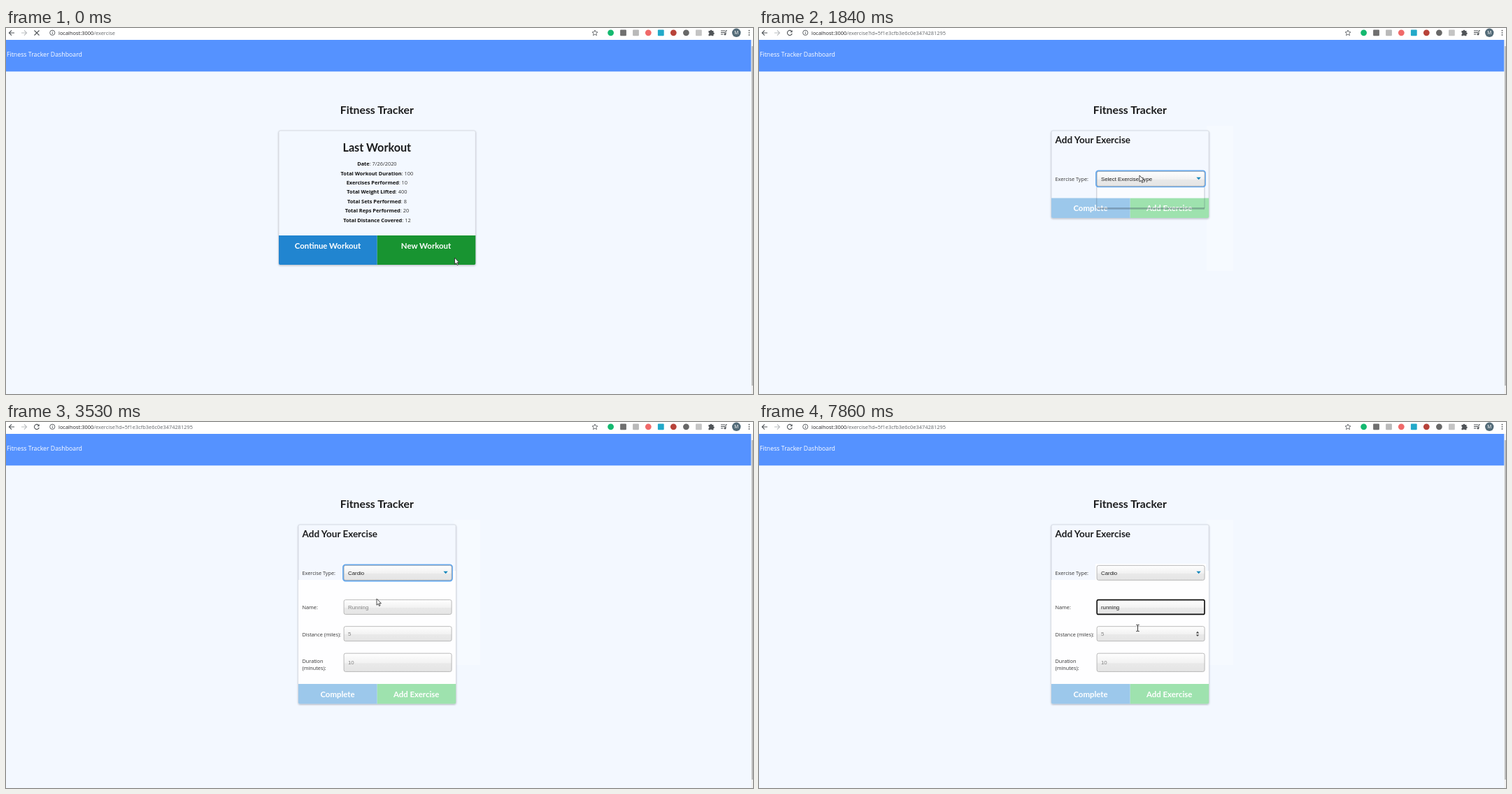
Recreate the animation shown at these times as an HTML page. Size 1068 by 524 pixels, loop 8000 ms.

```html
<!DOCTYPE html>
<html lang="en">
<head>
<meta charset="utf-8">
<title>Fitness Tracker</title>
<style>
  html, body { margin: 0; width: 100%; height: 100%; overflow: hidden; background: #f3f8ff; }
  svg { display: block; width: 1068px; height: 524px; }
  text { font: 7.3px "Open Sans", "Noto Sans", sans-serif; fill: #333; white-space: pre; }
  .mid { text-anchor: middle; }
  .head { font: 700 15.8px Lato, sans-serif; fill: #1b1c1d; }
  .btn { font: 700 11.4px Lato, sans-serif; fill: #fff; text-anchor: middle; }
  .url { font-size: 7.45px; fill: #63676b; }
  .row { font-size: 7.4px; text-anchor: middle; }
  .row tspan { font-weight: 700; fill: #111; }
  .field { font: 7.87px "Liberation Sans", Arial, sans-serif; fill: #222; }
  .hint { fill: #858585; }
  .line { fill: none; stroke: #505458; stroke-width: 1.1; }
</style>
</head>
<body>
<svg viewBox="0 0 1068 524">
  <defs>
    <linearGradient id="shade" x2="0" y2="1">
      <stop offset="0" stop-color="#fff"/><stop offset=".18" stop-color="#fafafa"/>
      <stop offset=".52" stop-color="#f2f2f2"/><stop offset=".56" stop-color="#e9e9e9"/>
      <stop offset="1" stop-color="#e5e5e5"/>
    </linearGradient>
    <filter id="soft" x="-10%" y="-10%" width="120%" height="125%">
      <feDropShadow dx="0" dy="1" stdDeviation="1" flood-color="#556" flood-opacity=".4"/>
    </filter>
  </defs>

  <rect width="1068" height="524" fill="#f3f8ff"/>
  <rect width="1068" height="17" fill="#fff"/>
  <rect y="17" width="1065.5" height="45.3" fill="#5592ff"/>
  <rect x="1065.5" y="17" width="2.5" height="507" fill="#f1f1f1"/>
  <rect x="1066" y="26" width="2" height="486" fill="#bcbcbc"/>

  <g class="line">
    <path d="M12 7H4.5M8 3.4 4.4 7 8 10.6"/>
    <path d="M22 7h7.5M26 3.4 29.6 7 26 10.6" stroke="#babdc0"/>
    <path id="stop" d="M40.5 3.5l7 7M47.5 3.5l-7 7"/>
    <g id="reload"><path d="M46.6 4.6A3.5 3.5 0 1 0 47.3 8"/><path d="M47.7 3v3.2h-3.2z" fill="#505458" stroke="none"/></g>
    <circle cx="66.3" cy="6.8" r="3.6" stroke-width=".9"/>
    <path d="M66.3 6.3v2.6M66.3 4.6v.9" stroke-width=".9"/>
    <path d="M842 3l1.1 2.6 2.9.3-2.2 1.9.7 2.8-2.5-1.5-2.5 1.5.7-2.8-2.2-1.9 2.9-.3z" stroke-width=".8"/>
    <path d="M1022 4h6M1022 6.5h6M1022 9h3.5" stroke-width="1"/>
    <path d="M1029 9V3.8h2" stroke-width="1"/>
  </g>
  <circle cx="1028" cy="9" r="1.4" fill="#505458"/>
  <g id="addons"></g>
  <path d="M1004.5 4h2.2a1.3 1.3 0 0 1 2.6 0h2.2v2.4a1.3 1.3 0 0 1 0 2.6v2.2h-2.4a1.3 1.3 0 0 0-2.4 0h-2.2V8.9a1.3 1.3 0 0 0 0-2.5z" fill="#505458"/>
  <circle cx="1044.3" cy="6.8" r="6.2" fill="#536b78"/>
  <text class="mid" x="1044.3" y="9.2" style="font-size:6.6px;fill:#fff">M</text>
  <g fill="#505458"><circle cx="1062.5" cy="3.7" r=".9"/><circle cx="1062.5" cy="6.8" r=".9"/><circle cx="1062.5" cy="9.9" r=".9"/></g>

  <text class="url" x="75" y="9.6"><tspan fill="#202124">localhost:3000</tspan>/exercise<tspan id="query">?id=5f1e3cfb3e6c0e3474281295</tspan></text>
  <text x="1" y="41" style="font-size:8.77px;fill:#fff">Fitness Tracker Dashboard</text>
  <text class="head mid" x="530.3" y="123.3">Fitness Tracker</text>

  <g id="dash">
    <rect x="390" y="147" width="281.3" height="192" rx="2" fill="#f3f8ff" stroke="#d0d3d8" stroke-width=".7" filter="url(#soft)"/>
    <text class="head mid" x="530.3" y="176.7" style="font-size:16.2px">Last Workout</text>
    <g id="stats"></g>
    <path d="M390 297h140.7v42H392a2 2 0 0 1-2-2z" fill="#2185d0"/>
    <path d="M530.7 297h140.6v40a2 2 0 0 1-2 2H530.7z" fill="#189431"/>
    <text class="btn" x="460" y="316">Continue Workout</text>
    <text class="btn" x="600.5" y="316">New Workout</text>
  </g>

  <g id="form">
    <rect id="glow" y="140" height="208" fill="#f6faff"/>
    <rect id="card" x="418" y="147" width="225.2" rx="2" stroke="#ccd2da" stroke-width=".7" filter="url(#soft)"/>
    <path id="white" d="M481 203h158v10h4v164H418V226h63z" fill="#fefeff"/>
    <text class="head" x="423.5" y="165.4" style="font-size:13.5px">Add Your Exercise</text>
    <text x="423.5" y="219">Exercise Type:</text>
    <rect id="ring" x="482.3" y="204.6" width="155.4" height="22.6" rx="3" fill="none" stroke="#62a8f0" stroke-width="2.4"/>
    <g id="select"></g>
    <text id="choice" class="field" x="489" y="218.5"></text>
    <path d="M625.4 213.8h6.4l-3.2 3.4z" fill="#0c86bb"/>

    <g id="more">
      <text x="423.5" y="268.4">Name:</text>
      <text x="423.5" y="306.5">Distance (miles):</text>
      <text x="423.5" y="344.8">Duration</text>
      <text x="423.5" y="355.2">(minutes):</text>
      <g id="inputs"></g>
      <rect id="focus" x="483.2" y="254.6" width="153.8" height="20.8" rx="2" fill="none" stroke="#111" stroke-width="1.6"/>
      <text id="name" class="field" x="489" y="268"></text>
      <path id="caret" d="M0 260.3v9.6" stroke="#111" stroke-width=".8"/>
      <text class="field hint" x="489" y="306.1">5</text>
      <text class="field hint" x="489" y="347.3">10</text>
      <path id="spin" d="M624.8 302.4h4.4l-2.2-2.6zM624.8 304.4h4.4l-2.2 2.6z" fill="#444"/>
    </g>

    <g id="buttons">
      <path d="M418 243.4h112.7V272H420a2 2 0 0 1-2-2z" fill="#9cc8eb"/>
      <path d="M530.7 243.4h112.5V270a2 2 0 0 1-2 2H530.7z" fill="#9ee2ae"/>
      <text class="btn" x="474" y="262">Complete</text>
      <text class="btn" x="586.7" y="262">Add Exercise</text>
    </g>

    <g id="opening">
      <rect x="482.8" y="228" width="154.2" height="15.4" fill="#fff" opacity=".6"/>
      <path d="M482.8 228v30H637v-30" fill="none" stroke="#456" stroke-opacity=".3"/>
      <path d="M483 258.6h154" stroke="#345" stroke-opacity=".22" stroke-width="3"/>
    </g>
    <g id="menu">
      <rect x="483.2" y="226.6" width="153.4" height="31" fill="#fff" stroke="#777" stroke-width=".8" filter="url(#soft)"/>
      <rect id="pick" x="483.6" width="152.6" height="10.2" fill="#c8c8c8"/>
      <text class="field hint" x="489" y="234.4">Select Exercise Type</text>
      <text class="field" x="489" y="244.6">Resistance</text>
      <text class="field" x="489" y="254.9">Cardio</text>
    </g>
  </g>

  <g id="arrow"><path d="M0 0V9.2L2.1 7.2 3.5 10.4 5 9.8 3.6 6.7H6.4Z" fill="#fff" stroke="#222" stroke-width=".8"/></g>
  <g id="hand"><path d="M-1.7 1.2V-5.4a1 1 0 0 1 2 0V-2l4 .9q.9.3.8 1.3L4.6 3.8 3.8 6.6H-1L-4.4 1.9q-.3-1.2 1-1.2z" fill="#fff" stroke="#222" stroke-width=".9"/><path d="M.3-2V.6M2-1.6V.8M3.6-1.2V1" stroke="#222" stroke-width=".6"/></g>
  <g id="beam"><path d="M-2.2-4.6h1.7l.5.5.5-.5h1.7M0-4.1v8.2M-2.2 4.6h1.7l.5-.5.5.5h1.7" fill="none" stroke="#222" stroke-width=".9"/></g>
</svg>
<script>
const LOOP = 8000;
const $ = id => document.getElementById(id);
const show = (id, on) => { $(id).style.display = on ? "" : "none"; };

// Toolbar add-ons: centre x, colour, round
$("addons").innerHTML = [
  [864.6, "#14b970", 1], [882.5, "#707070", 0], [900.5, "#b9b9b9", 0], [918.3, "#f06a6a", 1],
  [936.3, "#22a9c9", 0], [954.3, "#b8433a", 1], [972.4, "#686868", 1], [990.4, "#c4c4c4", 0]
].map(([x, fill, round]) =>
  `<rect x="${x - 4.4}" y="2.4" width="8.8" height="8.8" rx="${round ? 4.4 : 1}" fill="${fill}"/>`).join("");

$("stats").innerHTML = [
  ["Date", "7/26/2020"], ["Total Workout Duration", 100], ["Exercises Performed", 10],
  ["Total Weight Lifted", 400], ["Total Sets Performed", 8], ["Total Reps Performed", 20],
  ["Total Distance Covered", 12]
].map(([label, value], i) =>
  `<text class="row" x="530.4" y="${197.1 + i * 13.45}"><tspan>${label}</tspan>: ${value}</text>`).join("");

const box = (y, h) => `<rect x="483.1" y="${y}" width="154" height="${h}" rx="2.4" fill="url(#shade)" stroke="#aaa" stroke-width=".8"/>`;
$("select").innerHTML = box(205.4, 21);
$("inputs").innerHTML = box(254.6, 20.8) + box(292.7, 21) + box(331.2, 26.2);

const pointer = [
  [0, "arrow", 641.5, 329], [410, "hand", 642, 335], [570, "arrow", 641, 328],
  [710, "arrow", 639, 322], [850, "arrow", 629, 299], [990, "arrow", 606, 264],
  [1130, "arrow", 577, 234], [1270, "arrow", 554, 216], [1420, "arrow", 544, 211],
  [2270, "arrow", 543.5, 213], [2410, "arrow", 541, 222], [2550, "arrow", 538, 232],
  [2700, "arrow", 535.5, 238], [2830, "arrow", 533, 244], [2960, "arrow", 531, 249],
  [3090, "arrow", 530, 253], [3960, "arrow", 530.5, 254], [4100, "beam", 531, 260],
  [4240, "beam", 532, 262], [4370, "beam", 532, 263],
  [7590, "beam", 533, 267], [7720, "beam", 538, 282], [7860, "beam", 541.5, 295]
];
const typed = [
  [0, ""], [6060, "r"], [6210, "ru"], [6490, "runn"], [6770, "runni"], [6900, "runnin"], [7030, "running"]
];
const blink = [[0, false], [4510, true], [5070, false], [5630, true], [7590, false]];
const hover = [[0, 0], [2830, 1], [2960, 2]];
const at = (steps, t) => steps.findLast(s => s[0] <= t);

function draw(t) {
  const form = t >= 410, loaded = t >= 570, tall = t >= 3530, named = t >= 4510;
  show("stop", !loaded);
  show("reload", loaded);
  show("query", loaded);
  show("dash", !form);
  show("form", form);
  show("more", tall);
  show("white", tall);
  show("ring", t >= 1690 && !named);
  show("opening", t >= 1840 && t < 1990);
  show("menu", t >= 1990 && !tall);
  show("focus", named);
  show("spin", t >= 7860);

  $("glow").setAttribute("x", loaded ? 640 : 384);
  $("glow").setAttribute("width", loaded ? 38 : 294);
  $("card").setAttribute("height", tall ? 256.4 : 125);
  $("card").setAttribute("fill", loaded ? "#f4f8ff" : "#f8fbff");
  $("buttons").setAttribute("transform", `translate(0 ${tall ? 131.5 : 0})`);
  $("pick").setAttribute("y", 227 + at(hover, t)[1] * 10.2);
  $("choice").textContent = tall ? "Cardio" : "Select Exercise Type";

  const word = at(typed, t)[1], name = $("name");
  name.textContent = word || "Running";
  name.classList.toggle("hint", !word);
  const caret = at(blink, t)[1];
  show("caret", caret);
  if (caret) {
    const end = word ? name.getComputedTextLength() : 0;
    $("caret").setAttribute("transform", `translate(${489.5 + end} 0)`);
  }

  const [, kind, x, y] = at(pointer, t);
  for (const id of ["arrow", "hand", "beam"]) show(id, id === kind);
  $(kind).setAttribute("transform", `translate(${x} ${y})`);
}

const start = performance.now();
function tick() {
  draw((performance.now() - start) % LOOP);
  requestAnimationFrame(tick);
}
tick();
</script>
</body>
</html>
```
